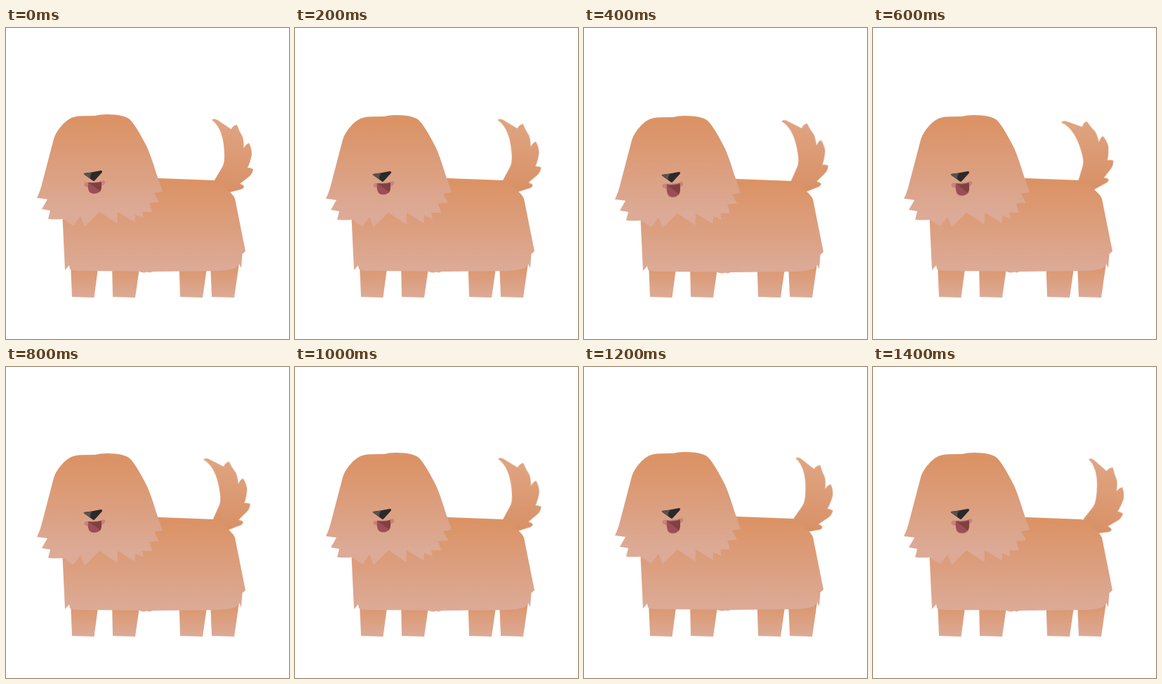
Animation, 403 px wide and 443 px high, one loop 1.6 s. Source, as an HTML page:

```html
<!DOCTYPE html>
<html lang="en">
<head>
<meta charset="utf-8">
<title>Wagging dog</title>
<style>
html, body { margin: 0; width: 100%; height: 100%; overflow: hidden; background: #fff; }
svg { display: block; width: 100vw; height: 100vh; }
.head, .body, .tail, .tongue { animation: 1.6s step-end infinite; }
.head { animation-name: nod; }
.body { animation-name: breathe; }
.tail { animation-name: wag; transform-origin: 296px 235px; }
.tongue { animation-name: pant; animation-duration: .8s; transform-origin: 126px 216px; }
@keyframes nod {
  0%, 50%, 100% { transform: none; }
  12.5%, 37.5% { transform: translateY(1px); }
  25% { transform: translateY(2px); }
  62.5%, 87.5% { transform: translateY(-1px); }
  75% { transform: translateY(-2px); }
}
@keyframes breathe {
  0%, 37.5%, 87.5%, 100% { transform: none; }
  25% { transform: translateY(1px); }
  75% { transform: translateY(-1px); }
}
@keyframes wag {
  0%, 100% { transform: none; }
  12.5% { transform: rotate(-2.5deg); }
  25% { transform: rotate(-6.6deg); }
  37.5% { transform: rotate(-14deg); }
  50% { transform: rotate(-6.6deg); }
  62.5% { transform: rotate(-2.2deg); }
  75% { transform: rotate(4.5deg); }
  87.5% { transform: rotate(7.7deg); }
}
@keyframes pant {
  0%, 100% { transform: none; }
  25% { transform: scaleY(1.02); }
  50% { transform: translateX(1px) scaleY(1.15); }
  75% { transform: translateX(1px) scaleY(1.09); }
}
</style>
</head>
<body>
<svg viewBox="0 0 403 443">
  <defs>
    <linearGradient id="headFur" gradientUnits="userSpaceOnUse" x1="0" y1="135" x2="0" y2="262">
      <stop stop-color="#db9366"/><stop offset="1" stop-color="#dcaa96"/>
    </linearGradient>
    <linearGradient id="bodyFur" gradientUnits="userSpaceOnUse" x1="0" y1="222" x2="0" y2="342">
      <stop stop-color="#db9366"/><stop offset="1" stop-color="#dcaa96"/>
    </linearGradient>
    <linearGradient id="legFur" gradientUnits="userSpaceOnUse" x1="0" y1="336" x2="0" y2="384">
      <stop stop-color="#db9569"/><stop offset="1" stop-color="#dcaa96"/>
    </linearGradient>
    <linearGradient id="tailFur" gradientUnits="userSpaceOnUse" x1="322" y1="135" x2="312" y2="230">
      <stop stop-color="#dfa481"/><stop offset="1" stop-color="#d89167"/>
    </linearGradient>
  </defs>

  <path fill="url(#legFur)" d="M92 335H132L125.5 384L94 383ZM151 335H191L184 384L152 383ZM246.500 335H287L280 384L248 383ZM291 335H332L325 384L293 383Z"/>

  <g class="body">
    <path class="tail" fill="url(#tailFur)" d="M293 131Q296 128 301 131L320.500 144Q324 138 329 138Q332 147 337 155Q339 162 338.500 171Q342 165 346 164Q350 171 350 180Q348 191 344 199Q348 199 352 201Q351 207 347 211L333 222Q338 223 339 226Q338 229 334 230L319 234L300 240L295 220L308 198Q311 193 311 182C311 160 306 140 293 131Z"/>
    <path fill="url(#bodyFur)" d="M80 260L205 213.500L297 217Q308 223 316 231Q324 238 326 243L341 318L336.500 322L335 342L332 336Q329 342 324 343Q314 346 303 346L209 347L204.500 348.500L201 347.500Q196 350 189 346.500L104 346Q95 346 91 343.500L90 338L84 345Z"/>
  </g>

  <g class="head">
    <path fill="url(#headFur)" d="M44 242Q49 232 52 219L68 158Q70 151 76 143Q87 128 100 126Q106 125 127 125Q134 123 144 123Q167 123 176 130Q184 137 201 170Q207 184 214 207L223 233L211 235L218 248L204 249L208 262L194 262L196 271L184 266L183.500 277L159 262L158.500 279L133 262L112 283L106 268L96 282L81 272Q72 273 60 272L63 260L51 258L59 244Z"/>
    <path fill="#c5857d" d="M112 221Q110 225 114 226Q126 230 138 224Q142 222 141 218Q138 216 134 219L119 220Q114 219 112 221Z"/>
    <g class="tongue">
      <path fill="#9b4e57" d="M117 220Q126 222 135.500 219Q137 229 134 233Q130 236 126 236Q120 236 118 232Q116 227 117 220Z"/>
      <path fill="#80403f" d="M117 220Q126 222 135.500 219Q137 229 134 232Z"/>
    </g>
    <path fill="#2b2929" d="M111 207L122 205.500L135 203Q138 203 136.500 206L126 217.500Q125 218.500 123 217L112 209Q110 208 111 207Z"/>
    <path fill="#565350" d="M111 207L123 205.500Q119 209 120.500 214.500L112 209Q110 208 111 207Z"/>
  </g>
</svg>
</body>
</html>
```
